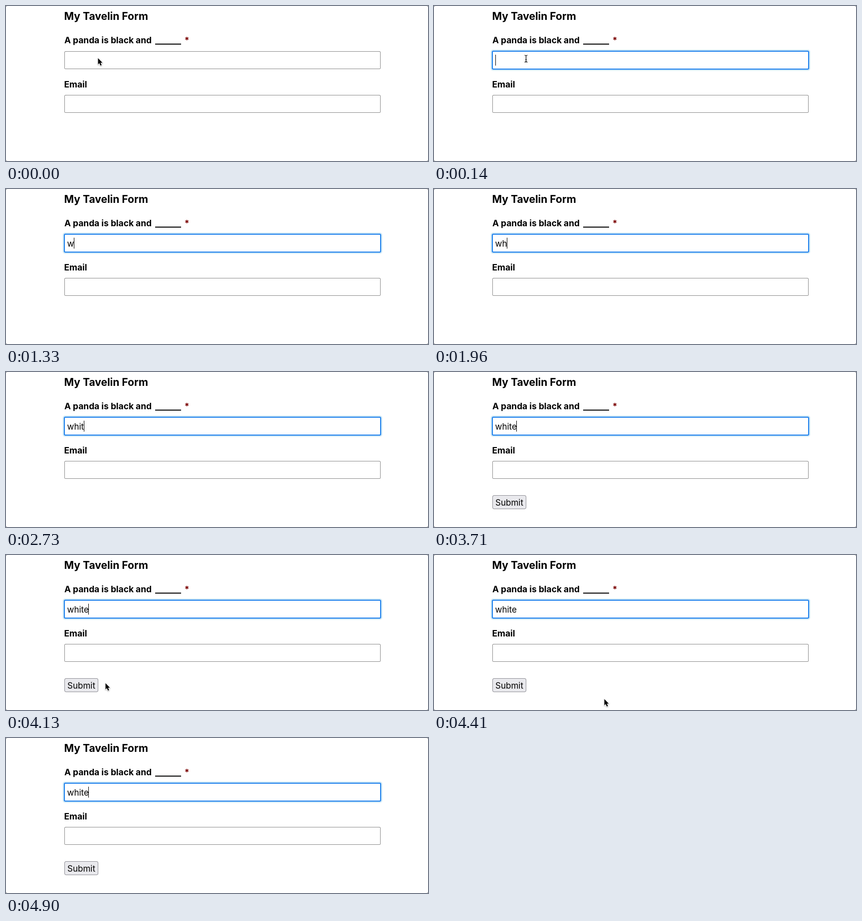
Write an HTML page with a canvas that moves like this. It is 846 px wide and 312 px high and loops after 4.97 s.

```html
<!DOCTYPE html>
<html lang="en">
<head>
<meta charset="utf-8">
<title>Form demo</title>
<style>
  html, body { margin: 0; width: 100%; height: 100%; overflow: hidden; background: #fff; }
  canvas { display: block; width: 846px; height: 312px; }
</style>
</head>
<body>
<canvas id="stage"></canvas>
<script>
const W = 846, H = 312, LOOP = 4970, TICK = 70;
const canvas = document.getElementById('stage');
const ctx = canvas.getContext('2d');
const ratio = window.devicePixelRatio || 1;
canvas.width = W * ratio;
canvas.height = H * ratio;

const SANS = 'Inter, "Liberation Sans", sans-serif';
const BODY = '400 17px ' + SANS;
const LABEL = '700 17.4px ' + SANS;
const TITLE = '700 21px ' + SANS;

const WORD = 'white';
const KEY_TIMES = [1330, 1890, 2310, 2730, 3080];
// Caret spans: start, end
const CARET_ON = [[140, 560], [1330, 3290], [3710, 4270], [4900, LOOP]];
const BUTTON_AT = 3430;

// Pointer positions, one per tick, once the mouse moves again
const MOVE_START = 3850;
const MOVE_PATH = [
  [168, 110], [143, 150], [131, 198], [150, 240], [199, 258], [240, 264],
  [284, 272], [321, 281], [341, 290], [358, 299], [372, 307]
];

function text(str, x, y, font, color = '#000', align = 'left') {
  ctx.font = font;
  ctx.fillStyle = color;
  ctx.textAlign = align;
  ctx.fillText(str, x, y);
}

function box(x, y, w, h, r, fill) {
  ctx.beginPath();
  ctx.roundRect(x, y, w, h, r);
  ctx.fillStyle = fill;
  ctx.fill();
}

function framed(x, y, w, h, r, line, border, fill) {
  box(x, y, w, h, r, border);
  box(x + line, y + line, w - 2 * line, h - 2 * line, Math.max(r - line, 0), fill);
}

function field(y, focus) {
  if (!focus) {
    framed(117, y, 634, 36, 2.5, 1, '#8c8c8c', '#fff');
    return;
  }
  ctx.globalAlpha = focus;
  box(113, y - 4, 642, 44, 6, '#eef8fb');
  box(114, y - 3, 640, 42, 5, '#cde7f5');
  ctx.globalAlpha = 1;
  framed(116, y - 1, 636, 38, 3, 2, '#1b7fec', '#fff');
}

function arrow(x, y) {
  ctx.save();
  ctx.translate(x, y);
  ctx.beginPath();
  [[0.5, 0], [0.5, 12.6], [3.3, 10], [5.4, 15], [7.7, 14], [5.6, 9.2], [9.4, 9.2]]
    .forEach(p => ctx.lineTo(...p));
  ctx.closePath();
  ctx.shadowColor = 'rgba(0,0,0,.3)';
  ctx.shadowBlur = 2 * ratio;
  ctx.shadowOffsetY = ratio;
  ctx.lineJoin = 'round';
  ctx.lineWidth = 2;
  ctx.strokeStyle = '#fff';
  ctx.stroke();
  ctx.shadowColor = 'transparent';
  ctx.fillStyle = '#000';
  ctx.fill();
  ctx.restore();
}

function beam(x, y) {
  ctx.beginPath();
  for (const s of [-1, 1]) {
    ctx.moveTo(x - 3, y + 7 * s);
    ctx.quadraticCurveTo(x, y + 7 * s, x, y + 5 * s);
    ctx.quadraticCurveTo(x, y + 7 * s, x + 3, y + 7 * s);
  }
  ctx.moveTo(x, y - 6);
  ctx.lineTo(x, y + 6);
  ctx.moveTo(x - 1.5, y + 2);
  ctx.lineTo(x + 1.5, y + 2);
  ctx.lineWidth = 1.2;
  ctx.strokeStyle = '#000';
  ctx.stroke();
}

function pointer(t) {
  if (t < TICK) return arrow(184, 105);
  if (t < KEY_TIMES[0]) return beam(184.5, 106);
  const spot = MOVE_PATH[Math.floor((t - MOVE_START) / TICK)];
  if (!spot) return;
  const [x, y] = spot;
  const inField = (y > 91 && y < 127) || (y > 179 && y < 215);
  (inField ? beam : arrow)(x, y);
}

function draw(t) {
  ctx.setTransform(ratio, 0, 0, ratio, 0, 0);
  ctx.fillStyle = '#8a8a8a';
  ctx.fillRect(0, 0, W, H);
  box(0, 0, W, H, 3, '#fff');

  text('My Tavelin Form', 116.5, 28, TITLE);
  text('A panda is black and', 117, 75, LABEL);
  ctx.fillRect(299, 75.7, 52, 2);
  text('*', 362.5, 75, LABEL, '#790000', 'center');
  text('Email', 116.5, 164, LABEL);

  field(91, t < TICK ? 0 : t < 2 * TICK ? 0.5 : 1);
  field(179, 0);

  const typed = WORD.slice(0, KEY_TIMES.filter(k => t >= k).length);
  text(typed, 122.5, 116, BODY);
  if (CARET_ON.some(([a, b]) => t >= a && t < b)) {
    const end = typed ? 122.5 + ctx.measureText(typed).width : 123;
    ctx.fillRect(Math.floor(end), 98, 1, 22);
  }

  if (t >= BUTTON_AT) {
    framed(117, 248, 68, 28, 4, 1, '#8f8f96', '#e9e9ed');
    text('Submit', 151, 269, BODY, '#000', 'center');
  }
  pointer(t);
}

const start = performance.now();
function frame() {
  draw((performance.now() - start) % LOOP);
  requestAnimationFrame(frame);
}
frame();
</script>
</body>
</html>
```
